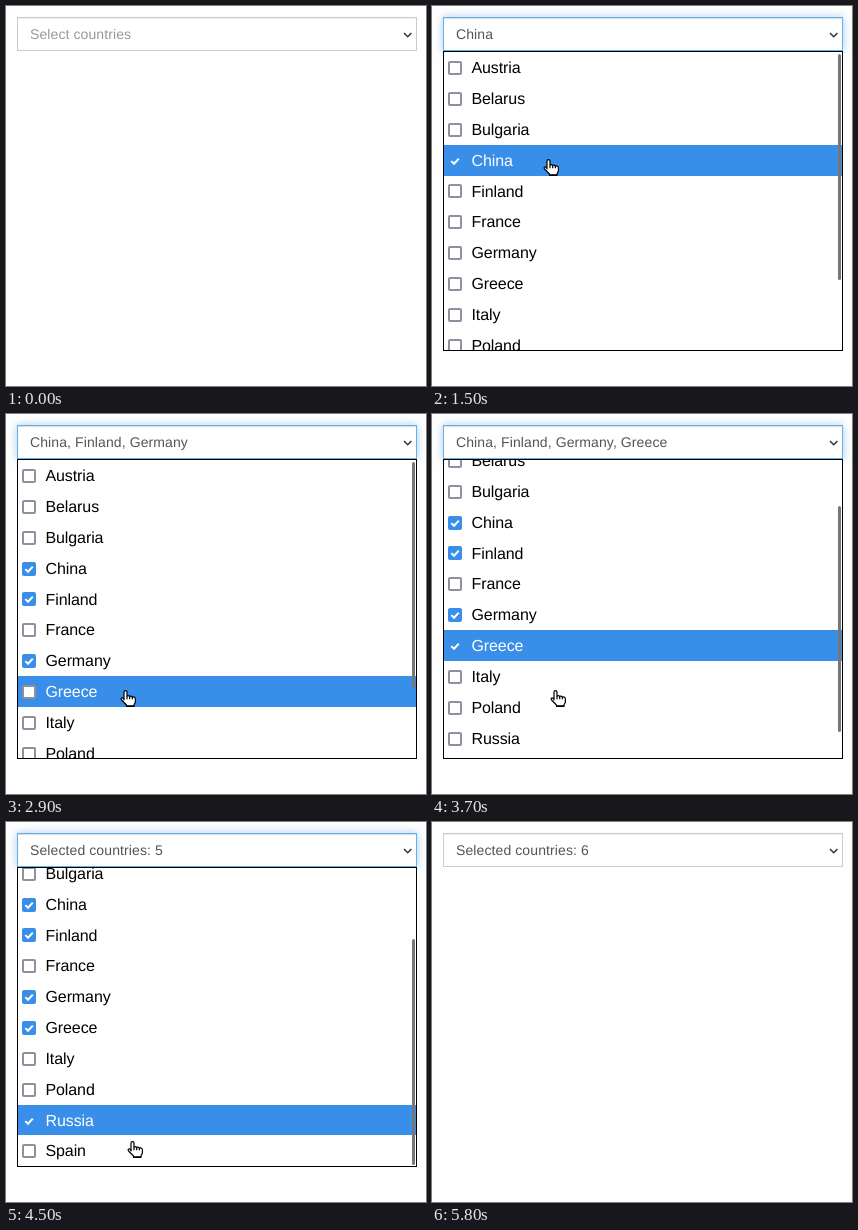
An HTML page for the animation above (7400 ms loop, 420 by 380 pixels).

```html
<!DOCTYPE html>
<html lang="en">
<head>
<meta charset="utf-8">
<title>Country select</title>
<style>
  * { box-sizing: border-box; }
  html, body { margin: 0; width: 100%; height: 100%; overflow: hidden; background: #fefefe; }
  body { position: relative; font-family: "Liberation Sans", Arial, sans-serif; text-rendering: geometricPrecision; }
  svg { position: absolute; overflow: visible; fill: none; }
  #field {
    position: absolute; left: 11px; top: 11px; width: 400px; height: 34px; padding-left: 12px;
    border: 1px solid #ccc; background: #fff; box-shadow: inset 0 1px 1px rgba(0, 0, 0, .075);
    font-size: 14px; line-height: 32px; letter-spacing: .1px; white-space: pre;
  }
  #glow {
    position: absolute; inset: -1px; border: 1px solid #66afe9;
    box-shadow: inset 0 1px 1px rgba(0, 0, 0, .075), 0 0 8px rgba(102, 175, 233, .6);
  }
  #list {
    position: absolute; left: 11px; top: 45px; width: 400px; height: 300px;
    border: 1px solid #000; background: #fff; overflow: hidden;
  }
  #rows { position: absolute; left: 0; width: 100%; }
  .row {
    position: absolute; width: 100%; height: 30.85px; padding-left: 27.5px;
    font-size: 16px; line-height: 33px; letter-spacing: -.1px; color: #000;
  }
  .hover { background: #388ee8; color: #fff; }
  .box {
    position: absolute; left: 4px; top: 8.93px; width: 14px; height: 14px;
    border: 2px solid #8f8f9d; border-radius: 2px; background: #fff;
  }
  .box svg { left: -2px; top: -2px; stroke: #fff; stroke-width: 2; display: none; }
  .checked .box { border-color: #388ee8; background: #388ee8; }
  .checked svg { display: block; }
  #thumb { position: absolute; left: 394px; width: 3px; height: 226px; border-radius: 2px; background: #777; }
  #pointer { left: 0; top: 0; fill: #fff; stroke: #000; stroke-linejoin: round; }
</style>
</head>
<body>
<div id="field"><span id="label"></span><div id="glow"></div>
  <svg style="left:384.5px;top:14px" width="9" height="6" stroke="#333" stroke-width="1.5"><path d="M1 1L4.7 4.7L8.4 1"/></svg>
</div>
<div id="list"><div id="rows"></div><div id="thumb"></div></div>
<svg id="pointer" width="20" height="20">
  <path id="arrow" d="M.5 .5V16L4 12.7L6.5 18.3L8.8 17.3L6.4 11.8H11.3Z"/>
  <g id="hand" transform="translate(-5)" stroke-width="1.2">
    <path d="M4 10V2Q4 .7 5.5 .7T7 2V6Q8.5 5.2 9.7 6.4Q11.2 5.8 12.4 7Q15.4 6.4 15.4 9V12L14 15V16.4H6.5V15L2 10.5Q.4 8.6 1.6 8T4 9.5Z"/>
    <path d="M7 6V9.3M9.7 6.6V9.3M12.4 7V9.3M6.5 15.9H14" fill="none"/>
  </g>
</svg>
<script>
const LOOP = 7400, STEP = 100;
const ENTER = 200, OPEN = 600, CLOSE = 5500, LEAVE = 5800;
const SCROLL_START = 3200, SCROLL_END = 3980, MAX_SCROLL = 72;
const ROW = 30.85, LIST_TOP = 46.12, LIST_BOTTOM = 345;
const HOTSPOT = 6; // the hover point lies this far above the drawn pointer

const countries = ["Austria", "Belarus", "Bulgaria", "China", "Finland", "France",
  "Germany", "Greece", "Italy", "Poland", "Russia", "Spain"];

const visits = [
  { name: "China", depart: 600, arrive: 1300, click: 1500 },
  { name: "Finland", depart: 1500, arrive: 1700, click: 2000 },
  { name: "Germany", depart: 2100, arrive: 2500, click: 2600 },
  { name: "Greece", depart: 2600, arrive: 2900, click: 3100 },
  { name: "Russia", depart: 4000, arrive: 4100, click: 4300 },
  { name: "Spain", depart: 4400, arrive: 4600, click: 4700 }
];

const $ = id => document.getElementById(id);
const show = (id, on) => { $(id).style.display = on ? "" : "none"; };
const ramp = (t, from, to) => Math.min(1, Math.max(0, (t - from) / (to - from)));
const easeOut = p => Math.sin(p * Math.PI / 2);
const scrollAt = t => Math.round(MAX_SCROLL * ramp(t, SCROLL_START, SCROLL_END));

function pointerAt(t) {
  let y = 5 + 22 * ramp(t, ENTER, 400);
  const moveTo = (goal, from, to) => { y += (goal - y) * easeOut(ramp(t, from, to)); };
  for (const { name, depart, arrive } of visits) {
    const middle = LIST_TOP + (countries.indexOf(name) + .5) * ROW;
    moveTo(middle - 1 - scrollAt(arrive), depart, arrive);
  }
  moveTo(369, 4900, 5700);
  const x = 134 - 18 * ramp(t, OPEN, 900) + Math.max(0, t - 2200) / 230;
  return { x, y };
}

// The highlight stays on its row until the scrolling ends.
function hoverAt(t) {
  const time = t > SCROLL_START && t < SCROLL_END ? SCROLL_START : t;
  return Math.floor((pointerAt(time).y - HOTSPOT - LIST_TOP + scrollAt(time)) / ROW);
}

function labelFor(names) {
  if (!names.length) return "Select countries";
  return names.length > 4 ? `Selected countries: ${names.length}` : names.join(", ");
}

const rows = countries.map((name, i) => {
  const row = document.createElement("div");
  row.style.top = LIST_TOP - 46 + i * ROW + "px";
  row.innerHTML = `<span class="box"><svg width="14" height="14"><path d="M3.3 7.1L6 9.8L10.8 4.6"/></svg></span>${name}`;
  return $("rows").appendChild(row);
});

function render(time) {
  const t = Math.floor(time % LOOP / STEP) * STEP;
  const chosen = visits.filter(visit => visit.click <= t).map(visit => visit.name);
  const hover = hoverAt(t), scroll = scrollAt(t), { x, y } = pointerAt(t);

  $("label").textContent = labelFor(chosen);
  $("label").style.color = chosen.length ? "#555" : "#999";
  $("glow").style.opacity = ramp(t, OPEN - STEP, OPEN + STEP) - ramp(t, CLOSE - STEP, CLOSE + STEP);

  show("list", t >= OPEN && t < CLOSE);
  rows.forEach((row, i) => {
    row.className = "row";
    row.classList.toggle("hover", i === hover);
    row.classList.toggle("checked", chosen.includes(countries[i]));
  });
  $("rows").style.top = -scroll + "px";
  $("thumb").style.top = Math.round(2 + scroll * 69 / MAX_SCROLL) + "px";

  const overList = y > LIST_TOP && y < LIST_BOTTOM;
  show("pointer", t >= ENTER && t < LEAVE);
  show("arrow", !overList);
  show("hand", overList);
  $("pointer").style.transform = `translate(${Math.round(x)}px, ${Math.round(y)}px)`;
}

const start = performance.now();
function tick() {
  render(performance.now() - start);
  requestAnimationFrame(tick);
}
tick();
</script>
</body>
</html>
```
